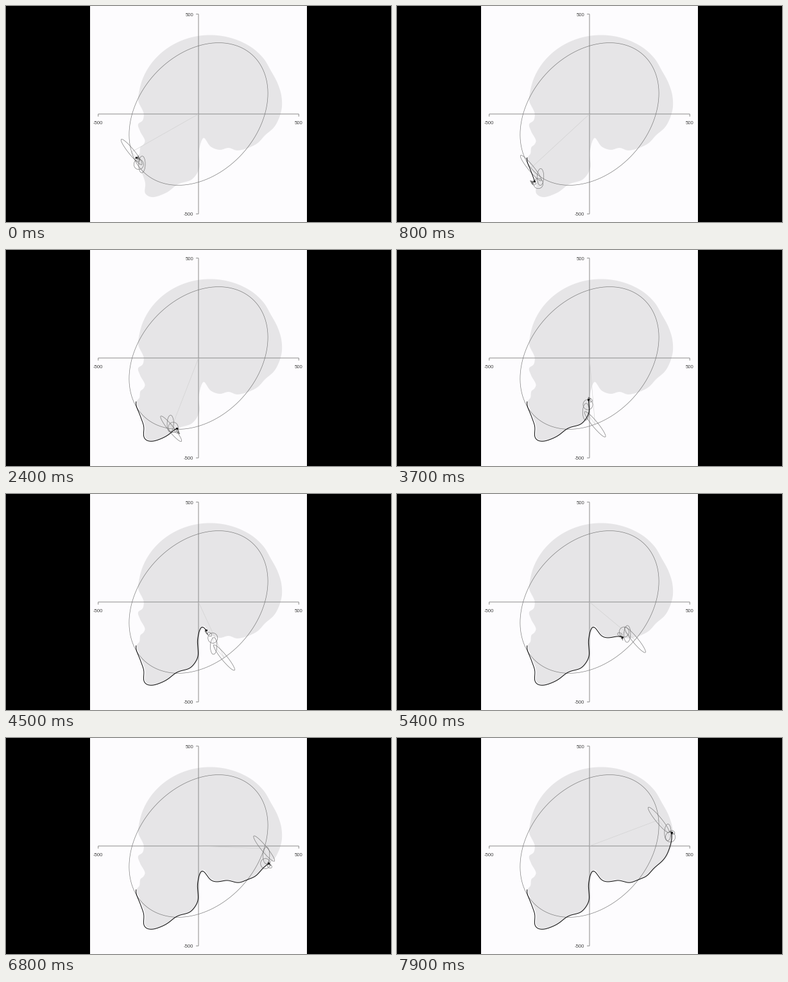
These frames come from a looping animation (600x338 px, 8000 ms). A matplotlib script:

```python
import numpy as np
import matplotlib.pyplot as plt
from matplotlib.animation import FuncAnimation
from matplotlib.collections import LineCollection
from matplotlib.patches import Polygon, Rectangle

W, H, DPI = 600, 338, 100
FRAMES, INTERVAL = 80, 100
PERIOD = 168          # frames for one full turn around the outline
HARMONICS = 32
CENTER = 300 + 169j
HALF = 156.3          # pixels for 500 units
PX = 72 / DPI         # points per pixel

# Key points of the jaw and skull base, and of the face profile
BASE = [(204, 237), (210, 256), (217, 277), (217, 293), (227, 299), (250, 292),
        (268, 279), (290, 271), (301, 254), (300.5, 228), (308, 206.5),
        (319, 220), (333, 225), (347, 222), (361, 226), (390, 216), (404, 202),
        (419, 188)]
FACE = [(206, 148), (214.5, 168), (213, 179), (206, 185), (209, 196),
        (216.5, 211), (214, 217), (209.5, 221), (208, 231)]


def dome():
    """Elliptic arc, a little flattened at the upper back."""
    a = np.linspace(-0.12, 3, 16)
    r = 1 - 0.033 * np.exp(-((a - 0.47) / 0.24) ** 2)
    return 318 + 112 * r * np.cos(a) + 1j * (150.5 - 105 * r * np.sin(a))


def spline(p, steps=24):
    """Closed centripetal Catmull-Rom curve through complex points."""
    p0, p1, p2, p3 = (np.roll(p, k)[:, None] for k in (1, 0, -1, -2))
    d1, d2, d3 = (np.sqrt(abs(b - a)) for a, b in ((p0, p1), (p1, p2), (p2, p3)))
    m1 = d2 * ((p1 - p0) / d1 - (p2 - p0) / (d1 + d2)) + p2 - p1
    m2 = d2 * ((p3 - p2) / d3 - (p3 - p1) / (d2 + d3)) + p2 - p1
    u = np.arange(steps) / steps
    curve = ((2 * u**3 - 3 * u**2 + 1) * p1 + (u**3 - 2 * u**2 + u) * m1
             + (3 * u**2 - 2 * u**3) * p2 + (u**3 - u**2) * m2)
    return curve.ravel()


def by_length(z, count=2048):
    """Resample a closed curve at equal arc steps."""
    z = np.append(z, z[0])
    s = np.append(0, np.cumsum(abs(np.diff(z))))
    return np.interp(np.linspace(0, s[-1], count, endpoint=False), s, z)


def points(pairs):
    return [complex(*p) for p in pairs]


def xy(z):
    return np.column_stack([z.real, z.imag])


outline = by_length(spline(np.r_[points(BASE), dome(), points(FACE)]))
coef = np.fft.fft(outline - CENTER) / len(outline)
orders = range(1, HARMONICS + 1)


def ellipse(k, angle):
    return coef[k] * np.exp(1j * angle) + coef[-k] * np.exp(-1j * angle)


def joints(s):
    """Centres of the chained ellipses, ending at the pen."""
    return CENTER + np.append(0, np.cumsum([ellipse(k, k * s) for k in orders]))


def drawn(s):
    return CENTER + sum(ellipse(k, k * s) for k in orders)


fig = plt.figure(figsize=(W / DPI, H / DPI), dpi=DPI, facecolor="black")
ax = fig.add_axes([0, 0, 1, 1])
ax.set(xlim=(0, W), ylim=(H, 0))
ax.axis("off")
ax.add_patch(Rectangle((131, 0), 338, H, fc="#fdfcfe", lw=0))
ax.add_patch(Polygon(xy(outline), fc="#e6e5e7", lw=0))

cx, cy = CENTER.real, CENTER.imag
label = dict(family="Liberation Sans", size=7.8 * PX, color="#444444")
rule = dict(color="#8c8c8c", lw=PX, solid_capstyle="butt", snap=False)
ax.plot([cx - HALF, cx + HALF], [cy, cy], **rule)
ax.plot([cx, cx], [cy - HALF, cy + HALF], **rule)
for sign, text in ((-1, "-500"), (1, "500")):
    x, y = cx + sign * HALF, cy - sign * HALF
    ax.plot([x, x], [cy, cy + 4], **rule)
    ax.plot([cx - 4, cx], [y, y], **rule)
    ax.text(x, 184.6, text, ha="center", va="baseline", **label)
    ax.text(292, y + 2.8, text, ha="right", va="baseline", **label)

arms, = ax.plot([], [], color="#d0d0d0", lw=0.6 * PX)
rings = LineCollection([], colors="#757575", linewidths=0.65 * PX)
ax.add_collection(rings)
trace, = ax.plot([], [], color="black", lw=0.95 * PX)
pen, = ax.plot([], [], "o", color="black", ms=3 * PX, mew=0)

turn = np.linspace(0, 2 * np.pi, 121)
loops = [ellipse(k, turn) for k in orders]


def update(n):
    s = 2 * np.pi * n / PERIOD
    j = joints(s)
    arms.set_data(j.real, j.imag)
    rings.set_segments([xy(c + loop) for c, loop in zip(j, loops)])
    path = drawn(np.linspace(0, s, 4 * n + 2))
    trace.set_data(path.real, path.imag)
    pen.set_data([j[-1].real], [j[-1].imag])
    return arms, rings, trace, pen


anim = FuncAnimation(fig, update, frames=FRAMES, interval=INTERVAL,
                     repeat=True, repeat_delay=0)
plt.show()
```
